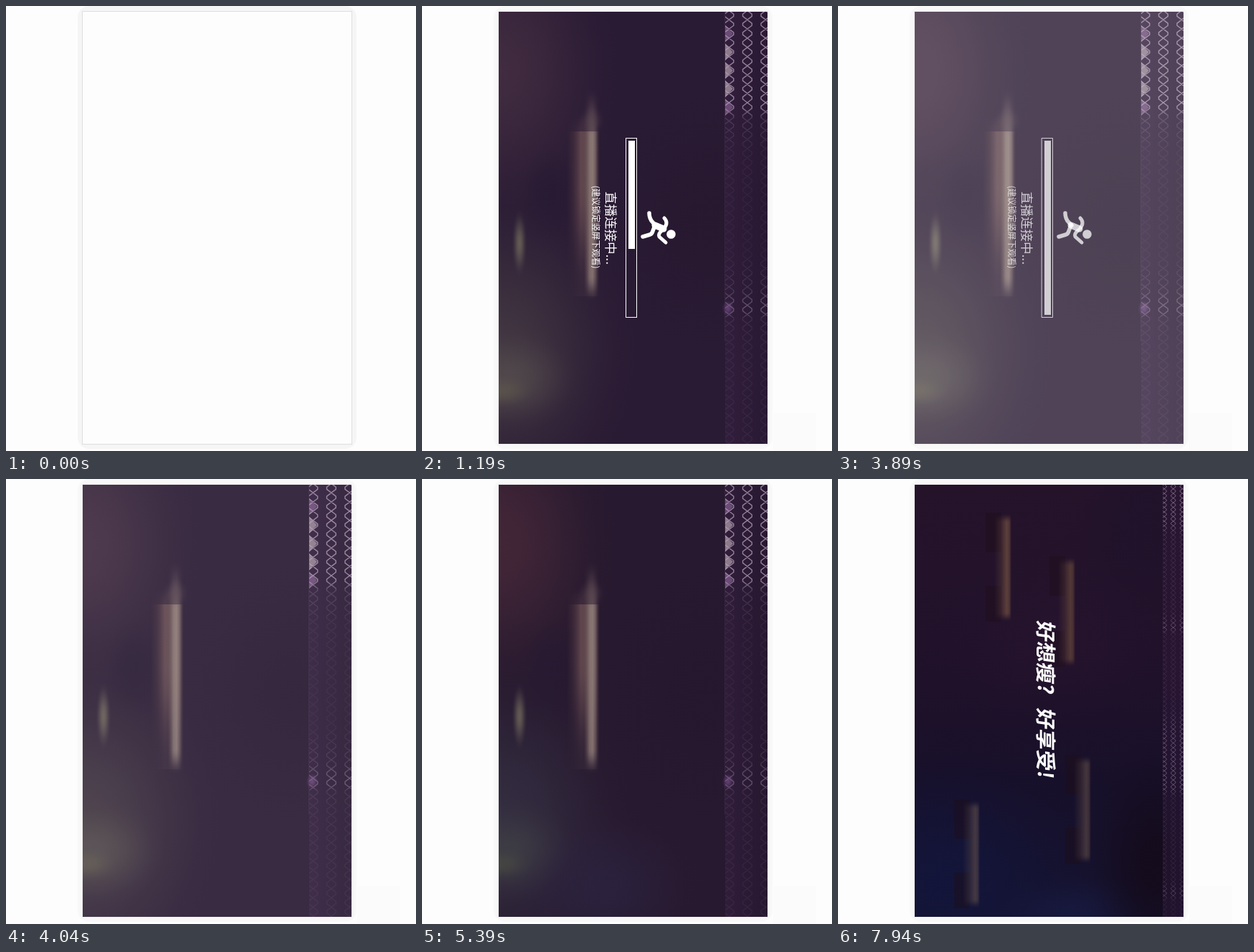
Animation, 572 px wide and 621 px high, one loop 8000 ms. Source, as an HTML page with a canvas:

```html
<!DOCTYPE html>
<html lang="zh-CN">
<head>
<meta charset="utf-8">
<title>直播连接中</title>
<style>
html, body { margin: 0; width: 100%; height: 100%; overflow: hidden; background: #fdfdfd; }
canvas { display: block; }
</style>
</head>
<body>
<canvas id="stage" width="572" height="621"></canvas>
<script>
const W = 572, H = 621, LOOP = 8000, STEP = 150;
const ctx = document.getElementById('stage').getContext('2d');
const FONT = '"Noto Sans CJK SC", "Noto Sans CJK", "Noto Sans", sans-serif';
const screen = { x: 107, y: 8, w: 375, h: 603 };

const clamp = v => Math.min(1, Math.max(0, v));
const smooth = (a, b, v) => { const u = clamp((v - a) / (b - a)); return u * u * (3 - 2 * u); };

// Share of a seven-step transition that is done at time t.
const stepped = (t, start) => clamp((Math.floor((t - start) / STEP) + 1) / 7);

function layer(paint) {
  const c = document.createElement('canvas');
  c.width = W;
  c.height = H;
  const g = c.getContext('2d');
  g.beginPath();
  g.rect(screen.x, screen.y, screen.w, screen.h);
  g.clip();
  paint(g);
  return c;
}

function fillScreen(g, style) {
  g.fillStyle = style;
  g.fillRect(screen.x, screen.y, screen.w, screen.h);
}

function blob(g, x, y, rx, ry, rgb, alpha) {
  g.save();
  g.translate(x, y);
  g.scale(rx, ry);
  const grad = g.createRadialGradient(0, 0, 0, 0, 0, 1);
  for (let i = 0; i <= 6; i++) {
    const a = alpha * (1 - smooth(0, 1, i / 6));
    grad.addColorStop(i / 6, `rgba(${rgb},${a})`);
  }
  g.fillStyle = grad;
  g.fillRect(-1, -1, 2, 2);
  g.restore();
}

// Vertical light: a horizontal colour profile with a vertical envelope.
function beam(g, x0, x1, y0, y1, stops, envelope) {
  const grad = g.createLinearGradient(x0, 0, x1, 0);
  stops.forEach(([p, rgb, a]) => grad.addColorStop(p, `rgba(${rgb},${a})`));
  g.save();
  g.fillStyle = grad;
  for (let y = y0; y < y1; y++) {
    g.globalAlpha = envelope(y);
    g.fillRect(x0, y, x1 - x0, 1);
  }
  g.restore();
}

function fence(g, left, cw, ch, y0, width, stops) {
  const right = screen.x + screen.w, bottom = screen.y + screen.h;
  const grad = g.createLinearGradient(0, screen.y, 0, bottom);
  stops.forEach(([y, a]) => grad.addColorStop((y - screen.y) / screen.h, `rgba(178,155,180,${a})`));
  g.save();
  g.beginPath();
  g.rect(left, screen.y, right - left, screen.h);
  g.clip();
  g.strokeStyle = grad;
  g.lineWidth = width;
  g.beginPath();
  for (let x = left - 1 - cw; x < right + cw; x += cw) {
    for (const dir of [0, 1]) {
      for (let y = y0 - ch, i = dir; y < bottom + ch; y += ch / 2, i++) {
        const px = x + (i % 2) * cw / 2;
        g.lineTo(px, y - ch * 0.06);
        g.lineTo(px, y + ch * 0.06);
      }
      g.moveTo(x + cw / 2, y0 - ch);
    }
    g.moveTo(x + cw, y0 - ch);
  }
  g.stroke();
  g.restore();
}

function hall(g, late) {
  fillScreen(g, late ? '#27192f' : '#2a1b34');
  blob(g, 110, 90, 165, 230, late ? '70,40,56' : '68,46,66', 0.85);
  blob(g, 110, 480, 190, 240, late ? '54,50,68' : '70,60,68', 0.8);
  blob(g, 120, 520, 105, 75, late ? '70,72,72' : '94,88,84', 0.55);
  blob(g, 112, 538, 45, 24, late ? '82,86,66' : '106,100,78', 0.4);
  if (late) blob(g, 255, 570, 140, 120, '44,36,66', 0.7);
  blob(g, 178, 262, 46, 75, '38,26,50', 0.75);
  blob(g, 400, 300, 160, 190, '36,22,44', 0.55);
  blob(g, 136, 331, 11, 48, '112,104, 92', 0.8);

  beam(g, 202, 248, 150, 405, [
    [0, '66,45,58', 0], [0.2, '72,50,62', 0.55], [0.42, '104,76,82', 0.85],
    [0.6, '104,80,82', 0.85], [0.85, '118,98,98', 0.8], [1, '60,42,55', 0]
  ], y => y < 175 ? 0.35 * smooth(150, 175, y) : 1 - 0.85 * smooth(250, 402, y));
  beam(g, 226, 248, 112, 412, [
    [0, '110,85,85', 0], [0.35, '142,122,118', 0.75], [0.55, '144,126,122', 0.85],
    [0.75, '120,98,98', 0.6], [1, '60,42,55', 0]
  ], y => y < 175 ? 0.4 * smooth(112, 160, y) : 1 - smooth(375, 412, y));
  blob(g, 236, 160, 20, 22, '90,70,80', 0.5);

  const strip = g.createLinearGradient(423, 0, 482, 0);
  strip.addColorStop(0, 'rgba(58,34,72,.45)');
  strip.addColorStop(1, 'rgba(40,22,50,.35)');
  g.fillStyle = strip;
  g.fillRect(423, 8, 59, 603);
  g.fillStyle = 'rgba(130,105,140,.16)';
  g.fillRect(422, 8, 1, 460);

  // Lit wall between the mesh and the edge of the strip.
  for (let y = 38.5; y < 145; y += 25.7) {
    g.fillStyle = y > 50 && y < 125 ? '#8d7a8b' : '#6d4b78';
    g.beginPath();
    g.moveTo(423, y - 12);
    g.lineTo(427, y - 7);
    g.lineTo(434, y);
    g.lineTo(427, y + 7);
    g.lineTo(423, y + 12);
    g.fill();
  }
  fence(g, 423, 25.5, 25.7, 12.8, 1.4, [
    [8, 0.78], [140, 0.78], [157, 0.22], [205, 0.07], [345, 0.05], [395, 0.18],
    [418, 0.42], [428, 0.38], [436, 0.13], [470, 0.08], [611, 0.07]
  ]);
  blob(g, 427, 422, 9, 12, '130,85,150', 0.6);
}

function night(g) {
  const base = g.createLinearGradient(0, 8, 0, 611);
  base.addColorStop(0, '#25132a');
  base.addColorStop(0.45, '#20112a');
  base.addColorStop(0.7, '#17102a');
  base.addColorStop(1, '#15122e');
  fillScreen(g, base);
  blob(g, 150, 560, 230, 190, '18,22,62', 0.75);
  blob(g, 330, 605, 130, 60, '24,28,70', 0.6);
  blob(g, 300, 220, 160, 130, '42,20,48', 0.5);
  blob(g, 440, 540, 100, 190, '20,10,24', 0.8);
  blob(g, 430, 70, 110, 150, '28,18,42', 0.6);

  const lamps = [
    [234, 47, 199, '98,68,60', 0.9], [323, 108, 262, '94,66,56', 0.8],
    [345, 385, 537, '84,66,66', 0.75], [190, 447, 599, '84,68,70', 0.75]
  ];
  for (const [x, top, bottom, rgb, alpha] of lamps) {
    g.fillStyle = 'rgba(30,14,26,.45)';
    g.fillRect(x - 28, top, 22, 55);
    g.fillRect(x - 28, bottom - 50, 22, 50);
    beam(g, x - 16, x + 8, top, bottom, [
      [0, rgb, 0], [0.4, rgb, 0.35], [0.72, rgb, alpha], [0.88, rgb, alpha * 0.75], [1, rgb, 0]
    ], y => smooth(top, top + 14, y) * (1 - smooth(bottom - 14, bottom, y)));
  }

  g.fillStyle = 'rgba(50,28,62,.42)';
  g.fillRect(453, 8, 29, 603);
  fence(g, 453, 12.6, 12.9, 10.5, 0.9, [
    [8, 0.62], [62, 0.58], [80, 0.18], [185, 0.14], [208, 0.45], [218, 0.1], [320, 0.14],
    [350, 0.42], [430, 0.5], [445, 0.12], [560, 0.12], [578, 0.35], [590, 0.08], [611, 0.07]
  ]);
}

function sideText(g, text, baseX, y, font, slant = 0) {
  g.save();
  g.translate(baseX, y);
  g.rotate(Math.PI / 2);
  g.transform(1, 0, -slant, 1, 0, 0);
  g.font = `${font} ${FONT}`;
  g.textBaseline = 'alphabetic';
  g.fillText(text, 0, 0);
  g.restore();
}

function runner(g) {
  g.lineWidth = 6;
  g.lineCap = g.lineJoin = 'round';
  const limbs = [
    'M317 289Q317 297 322 302L326 306',
    'M308 322L318 319Q321 318 322 314L325 306',
    'M325 306L337 311',
    'M338 310Q344 302 338 296',
    'M335 313Q329 318 331 322L340 330'
  ];
  limbs.forEach((d, i) => {
    g.lineWidth = i === 2 ? 9 : i < 2 ? 5.5 : 5;
    g.stroke(new Path2D(d));
  });
  g.beginPath();
  g.arc(347.5, 318.5, 6.3, 0, Math.PI * 2);
  g.fill();
}

function progressEnd(t) {
  const marks = [[2840, 431], [2090, 425], [1940, 415], [1640, 404], [1490, 372]];
  const hit = marks.find(([at]) => t >= at);
  return hit ? hit[1] : 339;
}

function loader(g, t) {
  g.fillStyle = g.strokeStyle = '#fff';
  g.lineWidth = 1;
  g.strokeRect(284.5, 184.5, 15, 250);
  g.fillRect(288, 188, 9, progressEnd(t) - 188);
  sideText(g, '直播连接中...', 256.5, 259, '17.5px');
  sideText(g, '(建议锁定竖屏下观看)', 237.5, 250.5, '12px');
  runner(g);
}

function title(g) {
  g.fillStyle = '#fff';
  sideText(g, '好想瘦?', 279, 197, '900 29px', 0.14);
  sideText(g, '好享受!', 279, 319, '900 29px', 0.14);
}

function frame(g, t) {
  g.fillStyle = '#fdfdfd';
  g.fillRect(0, 0, W, H);
  if (t >= 150) {
    g.fillStyle = '#fbfbfb';
    g.fillRect(490, 568, 60, 53);
  }
  g.fillStyle = t < 1190 ? '#f5f5f5' : '#f8f8f8';
  g.beginPath();
  g.roundRect(100, 0, 389, 618, 16);
  g.fill();
  g.fillStyle = t < 1190 ? '#dedede' : '#ededed';
  g.fillRect(106, 7, 377, 605);
  fillScreen(g, '#fdfdfd');
}

const early = layer(g => hall(g, false));
const late = layer(g => hall(g, true));
const dusk = layer(night);

function draw(t) {
  frame(ctx, t);
  if (t < 1190) return;
  ctx.drawImage(t < 4190 ? early : late, 0, 0);
  if (t >= 3890 && t < 4190) fillScreen(ctx, `rgba(255,255,255,${t < 4040 ? 0.175 : 0.07})`);
  if (t < 4040) {
    ctx.globalAlpha = t < 3890 ? 1 : 0.74;
    loader(ctx, t);
  }
  if (t >= 5690) {
    ctx.globalAlpha = stepped(t, 5690);
    ctx.drawImage(dusk, 0, 0);
  }
  if (t >= 6740) {
    ctx.globalAlpha = stepped(t, 6740);
    title(ctx);
  }
  ctx.globalAlpha = 1;
}

const start = performance.now();
function tick() {
  draw((performance.now() - start) % LOOP);
  requestAnimationFrame(tick);
}
tick();
</script>
</body>
</html>
```
